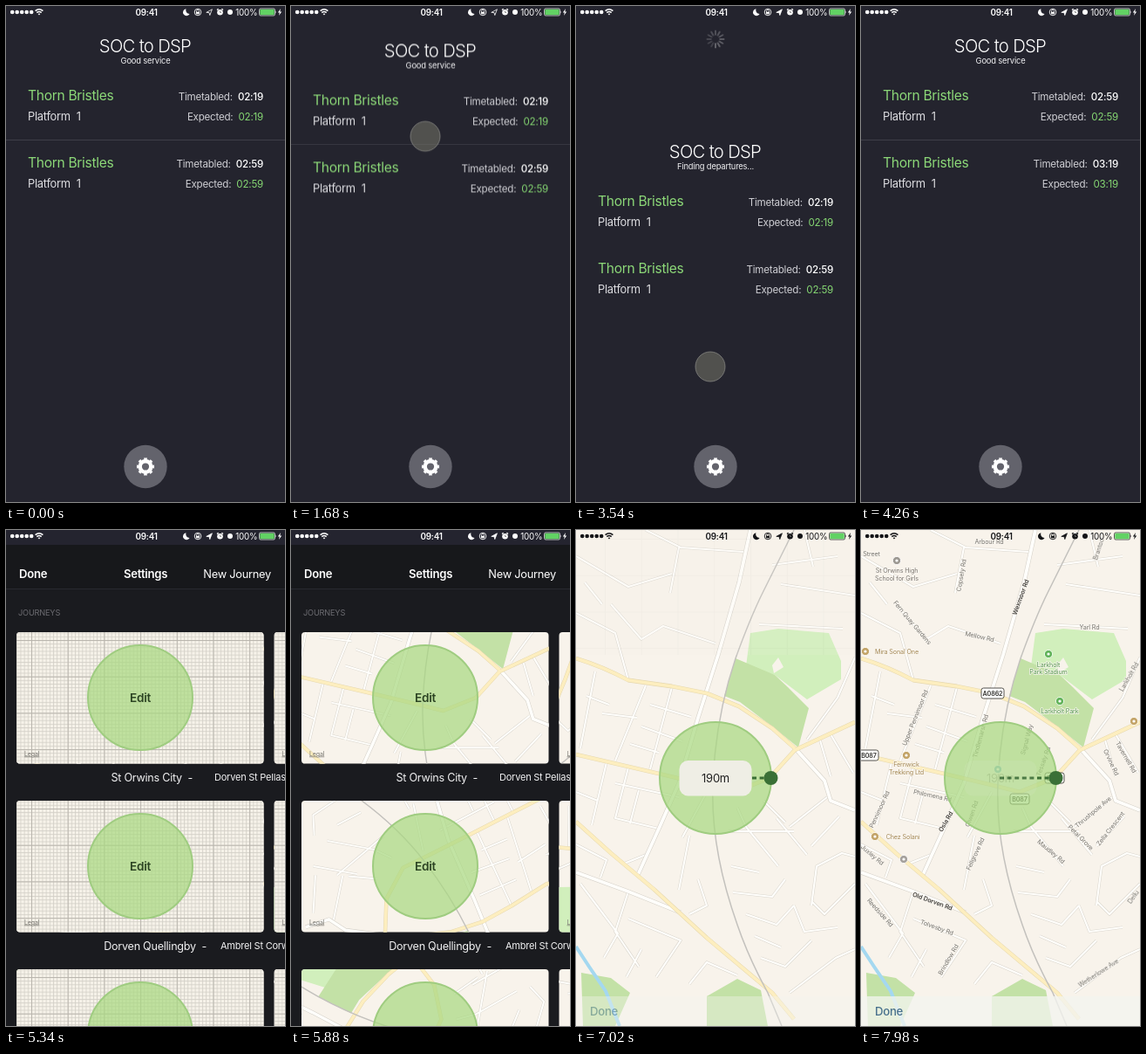
Recreate the animation shown at these times as an HTML page. Size 320 by 568 pixels, loop 8 s.

```html
<!DOCTYPE html>
<html lang="en">
<head>
<meta charset="utf-8">
<title>Departures</title>
<style>
html, body { margin: 0; width: 100%; height: 100%; overflow: hidden; background: #24242e; }
svg { display: block; }
text { font-family: Inter, "Liberation Sans", sans-serif; letter-spacing: -.02em; white-space: pre; }
.mid { text-anchor: middle; }
.end { text-anchor: end; }
.bold { font-weight: 600; }

/* One 8 s clock: 1% is 80 ms */
.a { animation: 8s linear infinite; }

#status { animation-name: status; font-size: 9.8px; color: #fff; }
@keyframes status { 0%, 81% { color: #fff } 81.01%, 100% { color: #131417 } }
#arrow { animation-name: arrow; }
@keyframes arrow { 0%, 33% { fill: transparent } 33.01%, 100% { fill: currentColor } }

#board { animation-name: pull; }
@keyframes pull {
  0%, 20.25% { transform: none; animation-timing-function: cubic-bezier(.35,.2,.5,1) }
  30.75% { transform: translateY(104px); animation-timing-function: ease-in-out }
  44.25%, 45.25% { transform: translateY(121px); animation-timing-function: ease-out }
  48.5%, 50% { transform: translateY(60px); animation-timing-function: ease-in-out }
  53%, 100% { transform: none }
}
#drag { animation-name: drag; }
@keyframes drag {
  0%, 19.5% { transform: translateY(137px); opacity: 0 }
  20.25% { transform: translateY(137px); opacity: 1; animation-timing-function: cubic-bezier(.35,.2,.5,1) }
  30.75% { transform: translateY(372px); animation-timing-function: ease-in-out }
  44.25%, 45.25% { transform: translateY(413px); opacity: 1 }
  46.5%, 100% { transform: translateY(413px); opacity: 0 }
}
.touch { fill: #77776a; fill-opacity: .55; stroke: #8a8a86; stroke-opacity: .75; }
#spinner { animation-name: spinner; }
@keyframes spinner { 0%, 22% { opacity: 0 } 27%, 49% { opacity: 1 } 52.5%, 100% { opacity: 0 } }
.tick { animation: tick 1s linear infinite; }
@keyframes tick { from { opacity: .6 } to { opacity: .25 } }
#rule { animation-name: rule; }
@keyframes rule { 0%, 20.25% { opacity: 1 } 23%, 51% { opacity: 0 } 53%, 100% { opacity: 1 } }
.old { animation-name: old; }
@keyframes old { 0%, 50% { opacity: 1 } 50.01%, 100% { opacity: 0 } }
.new { animation-name: new; }
@keyframes new { 0%, 50% { opacity: 0 } 50.01%, 100% { opacity: 1 } }
.good { animation-name: good; }
@keyframes good { 0%, 33% { opacity: 1 } 33.01%, 50% { opacity: 0 } 50.01%, 100% { opacity: 1 } }
.finding { animation-name: finding; }
@keyframes finding { 0%, 33% { opacity: 0 } 33.01%, 50% { opacity: 1 } 50.01%, 100% { opacity: 0 } }

#tapGear { animation-name: tapGear; }
@keyframes tapGear { 0%, 60% { opacity: 0 } 60.5%, 61.5% { opacity: 1 } 63%, 100% { opacity: 0 } }
#settings { animation-name: settings; }
@keyframes settings { 0%, 61.9% { opacity: 0; animation-timing-function: ease-out } 66.5%, 100% { opacity: 1 } }
.blank { animation-name: blank; }
@keyframes blank { 0%, 70% { opacity: 1 } 73%, 100% { opacity: 0 } }
#tapEdit { animation-name: tapEdit; }
@keyframes tapEdit { 0%, 78.5% { opacity: 0 } 79%, 80.5% { opacity: 1 } 81%, 100% { opacity: 0 } }
#header { animation-name: header; }
@keyframes header {
  0%, 81.5% { transform: none; animation-timing-function: ease-in }
  83.25% { transform: translateY(-19px) }
  86%, 100% { transform: translateY(-69px) }
}
#editor { animation-name: editor; }
@keyframes editor {
  0%, 81% { transform: translateY(117px); opacity: 0 }
  81.01% { transform: translateY(117px); opacity: 1; animation-timing-function: ease-in }
  83.25% { transform: translateY(58px); opacity: 1; animation-timing-function: ease-out }
  87%, 100% { transform: none; opacity: 1 }
}
#unloaded { animation-name: unloaded; }
@keyframes unloaded { 0%, 86% { opacity: 1 } 88%, 100% { opacity: 0 } }
#doneBar { animation-name: doneBar; }
@keyframes doneBar { 0%, 86% { opacity: 0 } 89.5%, 100% { opacity: 1 } }
#labels { animation-name: labels; font-size: 7.2px; }
@keyframes labels { 0%, 93.6% { opacity: 0 } 95.25%, 100% { opacity: 1 } }
#pill { animation-name: pill; }
@keyframes pill { 0%, 98.1% { opacity: 1 } 99.7%, 100% { opacity: .1 } }

.park { fill: #c3e1a6; }
.lawn { fill: #d1efbc; }
.case { stroke: #dad6ce; stroke-width: 3.2; }
.lane { stroke: #fffefb; stroke-width: 2.1; }
.halo { paint-order: stroke; stroke: #faf6f0; stroke-width: 1.6px; stroke-linejoin: round; }
.road { fill: #77756f; }
.major { fill: #45433f; font-weight: 600; }
.shop { fill: #a38753; }
.green { fill: #4f9448; }
.school { fill: #7b766f; }
.zone { fill: #a9d881; fill-opacity: .72; stroke: #9fcc80; stroke-width: 2; }
</style>
</head>
<body>
<svg width="320" height="568" viewBox="0 0 320 568">
<defs>
  <pattern id="grid" width="41.75" height="41.75" patternUnits="userSpaceOnUse" patternTransform="translate(33 10)">
    <path d="M.5 0V42M0 .5H42" stroke="#c6c3bc"/>
  </pattern>
  <pattern id="fine" width="4.17" height="4.17" patternUnits="userSpaceOnUse" patternTransform="translate(29 126)">
    <path d="M.5 0V5M0 .5H5" stroke="#d2cfc7" stroke-width=".8"/>
  </pattern>
  <pattern id="coarse" width="41.7" height="41.7" patternUnits="userSpaceOnUse" patternTransform="translate(29 126)">
    <path d="M.5 0V42M0 .5H42" stroke="#bab6ae"/>
  </pattern>
  <clipPath id="frame"><rect x="12" y="117" width="283.5" height="150.5" rx="4"/></clipPath>
  <g id="lanes">
    <path d="M0 30 60 65 110 50M40 85 75 125 100 110 160 130M118 20 108 72M80 0 120 20 192 25M0 95 45 118 60 172M10 60 30 85"/>
    <path d="M80 178 45 264M110 180 85 274M22 162 5 250M85 200 132 214M75 225 122 242M30 210 70 215M12 190 38 200M62 245 95 255"/>
    <path d="M45 290 118 306M35 266 18 338M60 272 45 330 95 342M0 300 25 310M72 298 62 336M0 360 35 378 28 398M55 382 80 372"/>
    <path d="M60 445 120 470 92 512M5 405 48 462 32 490M60 414 45 460 72 500M130 350 118 412M150 300 122 352M75 480 58 512"/>
    <path d="M195 340 232 385M175 345 250 345M230 330 265 372M270 362 302 328M245 340 288 306M215 310 240 335M185 318 195 340"/>
    <path d="M210 108 306 113M265 240 300 192 320 146M235 62 320 75M225 40 300 30M262 0 272 42M280 241 292 282M292 234 318 278"/>
    <path d="M245 530 298 490 320 480M178 385 210 392M180 415 225 420 240 400M195 440 230 452 250 430M205 465 235 478M212 490 240 500 270 470"/>
    <path d="M270 430 276 385 305 370 320 374M270 425 285 440 320 405M250 430 262 460 300 455M130 520 150 495 185 510M140 400 150 430 130 440"/>
  </g>
  <path id="avenues" d="M200 0 187 60 163 143 140 215 118 290 95 342 70 397M0 392 60 414 120 438M253 252 285 287 292 310 320 321"/>
  <path id="trunks" d="M0 147Q30 156 60 172L110 179 150 187 187 202 225 227 251 250M0 257 95 279 150 292 182 300 222 284 251 252 320 220M0 334 40 370 90 412 150 467 225 530 250 560"/>
  <g id="map" fill="none" stroke-linejoin="round">
    <rect x="-150" y="-150" width="620" height="870" fill="#f8f3eb"/>
    <path class="lawn" d="M200 118 232 113 290 118 304 150V171L265 194 228 166 195 156Z"/>
    <path class="park" d="M183 147 228 166 243 180 267 204 255 249 225 225 188 197 170 190Z"/>
    <path d="M227 164 225 155 232 146 238 157Z" fill="#f8f3eb"/>
    <path class="park" d="M6 507 40 513 62 530 45 568H8ZM150 534 185 514 212 527 220 568H150Z"/>
    <path d="M0 477 15 500 34 528 50 568" stroke="#a4d8f0" stroke-width="4"/>
    <use href="#lanes" class="case"/><use href="#lanes" class="lane"/>
    <use href="#avenues" stroke="#d6d2ca" stroke-width="5"/><use href="#avenues" stroke="#fffefb" stroke-width="3.8"/>
    <use href="#trunks" stroke="#e6d8b0" stroke-width="4.8"/><use href="#trunks" stroke="#fdeebf" stroke-width="3.7"/>
    <path d="M250 0Q230 40 215 70T183 147Q160 215 157 290T185 452Q198 490 220 530L236 568" stroke="#c3c1bd" stroke-width="1.5"/>
  </g>
</defs>

<rect width="320" height="568" fill="#24242e"/>
<g id="spinner" class="a" transform="translate(160 38)" stroke="#a2a2a6" stroke-width="1.7" stroke-linecap="round"></g>
<g id="board" class="a">
  <text class="mid" x="159.5" y="53" font-size="20.3" font-weight="300" fill="#fff" style="letter-spacing:-.035em">SOC to DSP</text>
  <g class="mid" font-size="9.4" fill="#f2f2f4">
    <text class="a good" x="160" y="65.5">Good service</text>
    <text class="a finding" x="160" y="65.5">Finding departures...</text>
  </g>
  <g id="trains"></g>
  <path id="rule" class="a" d="M0 153.5H320" stroke="#3e3e48"/>
</g>
<g transform="translate(160 527.5)">
  <circle r="24.7" fill="#63636c"/>
  <g fill="none" stroke="#fff">
    <circle r="6.3" stroke-width="4.4"/>
    <circle r="8.7" stroke-width="2.8" pathLength="16" stroke-dasharray="1" transform="rotate(-11)"/>
  </g>
</g>
<g id="drag" class="a"><circle class="touch" cx="154" r="17"/></g>
<circle id="tapGear" class="a touch" cx="160" cy="527" r="17"/>

<g id="settings" class="a">
  <rect width="320" height="568" fill="#1a1b1f"/>
  <text x="14" y="98" font-size="9.2" fill="#6c6c71">JOURNEYS</text>
  <g id="cards"></g>
  <g fill="#f2f2f3" font-size="12.6">
    <text class="end" x="214" y="287.5">St Orwins City  -</text>
    <text x="239" y="287" font-size="11">Dorven St Pellaster</text>
    <text class="end" x="230" y="480.5">Dorven Quellingby  -</text>
    <text x="246" y="480" font-size="11">Ambrel St Corwyn</text>
  </g>
  <circle id="tapEdit" class="a touch" cx="154" cy="192" r="17"/>

  <g id="editor" class="a">
    <svg width="320" height="568"><use href="#map"/></svg>
    <g id="unloaded" class="a">
      <rect width="320" height="143" fill="#f7f2ea"/>
      <rect width="320" height="143" fill="url(#grid)"/>
    </g>
    <g id="labels" class="a"></g>
    <circle class="zone" cx="160" cy="284" r="64"/>
    <path d="M159 284H222" stroke="#3a6f35" stroke-width="2.8" stroke-dasharray="5 3.6"/>
    <g id="pill" class="a">
      <rect x="118.5" y="264" width="83" height="40.5" rx="10" fill="#efeee5"/>
      <text class="mid" x="160" y="289" font-size="13" fill="#222">190m</text>
    </g>
    <circle cx="223.5" cy="284" r="8" fill="#3a7036"/>
    <g id="doneBar" class="a">
      <rect y="534" width="320" height="34" fill="#f3f4ef" fill-opacity=".78"/>
      <text x="16" y="556" font-size="13.2" font-weight="500" fill="#47708c">Done</text>
    </g>
  </g>

  <g id="header" class="a" fill="#fff" font-size="13.1">
    <rect y="-20" width="320" height="87" fill="#17181b"/>
    <rect width="320" height="17" fill="#24242f"/>
    <path d="M0 67.5H320" stroke="#292a30"/>
    <text class="bold" x="15" y="54.5">Done</text>
    <text class="bold mid" x="160" y="54.5">Settings</text>
    <text class="end" x="304" y="54.5" font-size="12.8">New Journey</text>
  </g>
</g>

<g id="status" class="a" fill="currentColor">
  <path d="M7.2 7H30" stroke="currentColor" stroke-width="4.6" stroke-linecap="round" stroke-dasharray="0 5.5"/>
  <g fill="none" stroke="currentColor" stroke-width="1.5">
    <path d="M33.6 5.6Q38 1.8 42.4 5.6M35.3 7.6Q38 5.3 40.7 7.6"/>
    <circle cx="220" cy="7" r="3.8" stroke-width=".9"/>
    <path d="M218.6 7V5.6a1.4 1.4 0 0 1 2.8 0V7" stroke-width=".8"/>
    <path id="arrow" class="a" d="M229.8 7.4 236.4 3.8 233.8 10.6 233 7.6Z" stroke-width=".8"/>
    <rect x="290.5" y="3" width="18" height="8" rx="1.6" stroke-width=".7"/>
  </g>
  <path d="M36.6 9Q38 8 39.4 9L38 10.6ZM206.5 3.2A4 4 0 1 0 210.6 9 4.2 4.2 0 0 1 206.5 3.2ZM218 6.8H222V9.3H218ZM309.4 5.5q1.2 1.5 0 3ZM315 3 311.8 7.6H313.8L313 11 316.2 6.4H314.2Z"/>
  <circle cx="245.5" cy="7.3" r="3.3"/>
  <path d="M242 4.5 243.6 3.2M249 4.5 247.4 3.2" stroke="currentColor" stroke-width="1.3"/>
  <path d="M245.5 5.4V7.5H247" fill="none" stroke="#777" stroke-width=".8"/>
  <circle cx="257" cy="7" r="3"/>
  <text class="mid bold" x="161" y="10.6">09:41</text>
  <text class="end" x="288.5" y="10.6">100%</text>
  <rect x="291.3" y="3.8" width="16.4" height="6.4" rx="1" fill="#62d264"/>
</g>
</svg>

<script>
const fill = (id, items, draw) =>
  document.getElementById(id).innerHTML = items.map(draw).join('');

fill('spinner', [...Array(12).keys()], i =>
  `<path class="tick" style="animation-delay:${i / 12 - 1}s" d="M0-5.2V-9.6" transform="rotate(${i * 30})"/>`);

const times = (y, time, cls) => `<g class="a end ${cls}" font-size="11.6" fill="#cfcfd4">
  <text class="end" x="295" y="${y + 5.5}">Timetabled:  <tspan fill="#fff" font-weight="500">${time}</tspan></text>
  <text class="end" x="295" y="${y + 28.5}">Expected:  <tspan fill="#86d873">${time}</tspan></text></g>`;

fill('trains', [[102, '02:19', '02:59'], [179.3, '02:59', '03:19']], ([y, before, after]) =>
  `<text x="25" y="${y + 5.5}" font-size="15.6" fill="#8cd878">Thorn Bristles</text>
  <text x="25" y="${y + 28.5}" font-size="12.9" fill="#dcdce0">Platform  1</text>
  ${times(y, before, 'old')}${times(y, after, 'new')}`);

// Each card shows the same district, turned differently per row
const cards = [0, 1, 2].flatMap(row => [0, 1].map(col => [row, col]));
fill('cards', cards, ([row, col]) =>
  `<g transform="translate(${col * 295.5} ${row * 193})"><g clip-path="url(#frame)">
  <use href="#map" transform="translate(154 192) rotate(${row * 140 + col * 70}) scale(.9375) translate(-160 -284)"/>
  <g class="a blank"><rect x="12" y="117" width="284" height="151" fill="#f6f2e9"/>
  <rect x="12" y="117" width="284" height="151" fill="url(#fine)"/>
  <rect x="12" y="117" width="284" height="151" fill="url(#coarse)"/></g>
  <circle class="zone" cx="154" cy="192" r="60"/>
  <text class="mid bold" x="154" y="197" font-size="13.6" fill="#2c4423">Edit</text>
  <text x="21" y="258.5" font-size="7" fill="#77756f" text-decoration="underline">Legal</text></g></g>`);

const label = (cls, text, x, y, angle = 0) =>
  `<text class="mid halo ${cls}" transform="translate(${x} ${y}) rotate(${angle})" y="2.6">${text}</text>`;
const pin = (color, x, y) =>
  `<circle cx="${x}" cy="${y}" r="4.6" fill="${color}" stroke="#fff" stroke-width=".8"/><circle cx="${x}" cy="${y}" r="1.6" fill="#fff"/>`;
const badge = (text, x, y, w) =>
  `<rect x="${x - w / 2}" y="${y - 6}" width="${w}" height="12" rx="2.5" fill="#fff" stroke="#55534e"/>
  <text class="mid bold" x="${x}" y="${y + 2.7}" fill="#33322f">${text}</text>`;

const roads = [
  ['Arbour Rd', 147, 13], ['Copsely Rd', 115, 52, -80], ['Fern Quay Gardens', 59, 106, 50],
  ['Mellow Rd', 136, 122, 12], ['Yarl Rd', 262, 111], ['Upper Pennimoor Rd', 62, 215, -68],
  ['Tindlemarsh Rd', 137, 236, -75], ['Signal Way', 190, 240, -75], ['Tessaly Rd', 209, 265, -70],
  ['Philomena Rd', 82, 304, 12], ['Pennimoor Rd', 21, 320, -65], ['Olwen Rd', 127, 325, -70],
  ['Fellgrove Rd', 131, 371, -65], ['Juxley Rd', 13, 372, 40], ['Tolvesby Rd', 87, 455, 20],
  ['Brindlow Rd', 100, 492, -60], ['Reedside Rd', 22, 438, 48], ['Maudley Rd', 218, 368, 40],
  ['Petal Grove', 252, 352, 45], ['Zella Crescent', 286, 342, -52], ['Thrushpole Ave', 266, 323, -40],
  ['Orvine Rd', 287, 266, 65], ['Tavernell Rd', 304, 260, 60], ['Larkholt Rd', 307, 168, -60],
  ['Wetherlowe Ave', 272, 507, -33], ['Brantoc', 272, 22, -72], ['Dellu', 312, 420, -55], ['Street', 12, 27]
];
const majors = [['Wexmoor Rd', 183, 77, -70], ['Osla Rd', 97, 334, -60], ['Old Dorven Rd', 82, 425, 20]];
const places = [
  ['school', 'St Orwins High', 41, 46], ['school', 'School for Girls', 41, 55],
  ['shop', 'Mira Sonal One', 41, 139], ['shop', 'Fernwick', 52, 268], ['shop', 'Trekking Ltd', 52, 277],
  ['shop', 'Chez Solani', 48, 351], ['green', 'Larkholt', 215, 154], ['green', 'Park Stadium', 215, 162],
  ['green', 'Larkholt Park', 228, 207]
];
const pins = [
  ['#9c9891', 41, 35], ['#c3a468', 5, 139], ['#c3a468', 52, 258], ['#c3a468', 16, 351], ['#c3a468', 313, 219],
  ['#62b35a', 215, 142], ['#62b35a', 228, 196], ['#6fb0c4', 157, 274], ['#a5a19c', 49, 377]
];
const badges = [['A0862', 151, 187, 26], ['B087', 9, 258, 22], ['B087', 182, 308, 22], ['B087', 222, 284, 22]];

document.getElementById('labels').innerHTML = [
  ...roads.map(r => label('road', ...r)),
  ...majors.map(r => label('major', ...r)),
  ...places.map(p => label(...p)),
  ...pins.map(p => pin(...p)),
  ...badges.map(b => badge(...b))
].join('');
</script>
</body>
</html>
```
